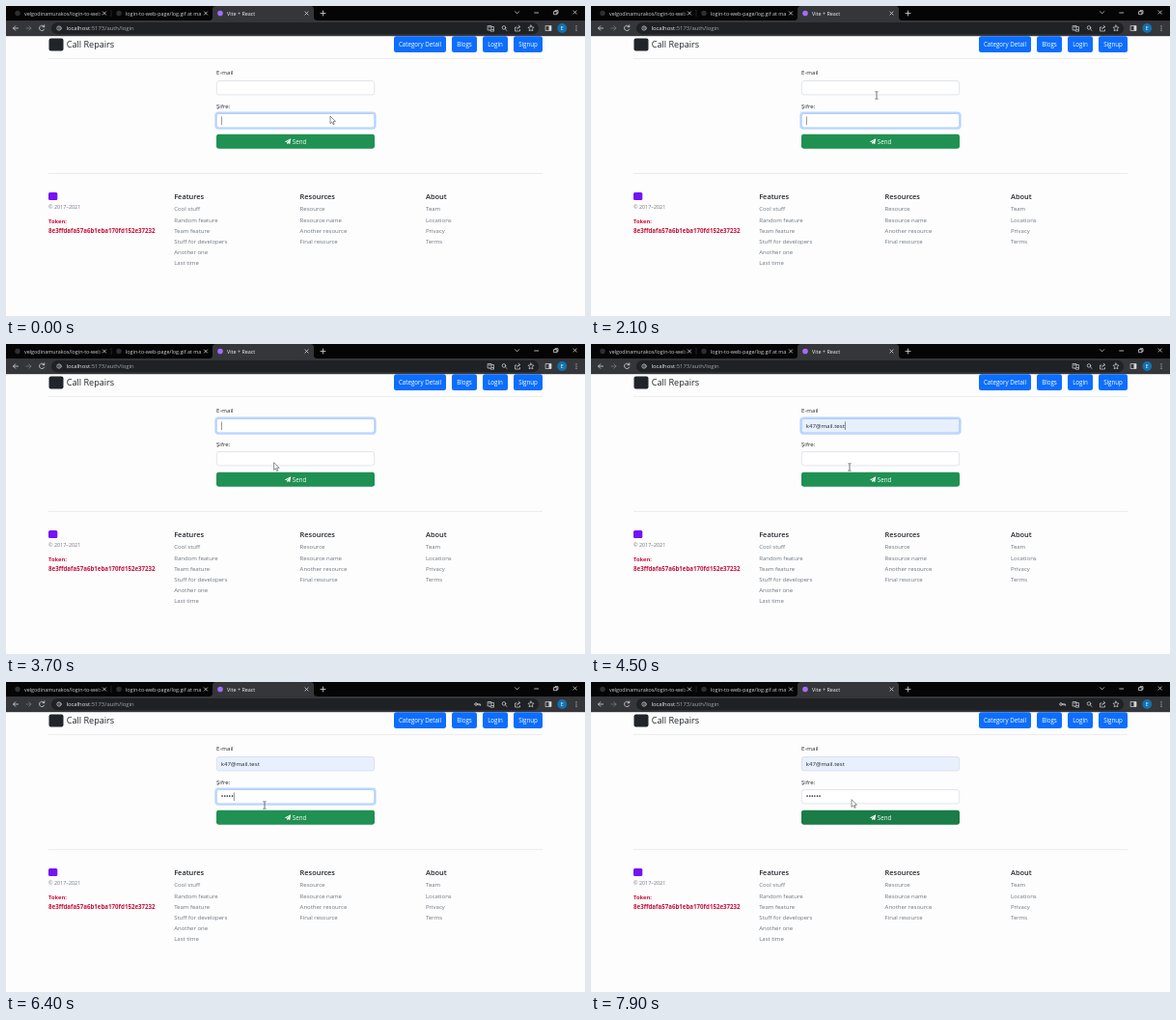
Write an HTML page that moves like this. It is 600 by 321 pixels and loops after 8 s.

```html
<!DOCTYPE html>
<html lang="en">
<head>
<meta charset="utf-8">
<title>Login form</title>
<style>
  html, body { margin: 0; width: 100%; height: 100%; overflow: hidden; background: #fdfdfe; }
  svg { display: block; width: 600px; height: 321px; }
  text { font: 6.1px "Open Sans", "Noto Sans", sans-serif; fill: #212529; white-space: pre; }
  .tab text { font-size: 5.4px; fill: #d0d3d7; }
  .tab .on { fill: #f1f3f4; }
  .line { fill: none; stroke: #d5d7da; stroke-width: .8; stroke-linecap: round; stroke-linejoin: round; }
  .brand { font-size: 9.1px; }
  .nav rect { fill: #0d6efd; }
  .nav text, .send text { fill: #fff; font-size: 6.2px; text-anchor: middle; }
  .rule { stroke: #e2e4e7; stroke-width: .7; }
  .head { font-size: 7.4px; font-weight: 600; }
  .link { font-size: 6px; fill: #6c757d; }
  .token { font-size: 6.17px; font-weight: 700; fill: #c9103a; }
  .ring { fill: none; stroke: #0d6efd; stroke-opacity: .28; stroke-width: 1.6; }
  .box { stroke-width: .6; }
  #caret { stroke: #222; stroke-width: .5; }
</style>
</head>
<body>
<svg viewBox="0 0 600 321">
  <defs>
    <linearGradient id="fade"><stop stop-color="#050505" stop-opacity="0"/><stop offset="1" stop-color="#050505"/></linearGradient>
    <path id="x" class="line" d="M-1.6-1.6 1.6 1.6M1.6-1.6-1.6 1.6"/>
  </defs>
  <rect width="600" height="321" fill="#fdfdfe"/>

  <!-- browser frame -->
  <rect width="600" height="16" fill="#050505"/>
  <rect y="15" width="600" height="16.2" fill="#35363a"/>
  <path d="M210.500 15q3.500 0 3.500-3.500V3.500q0-3.500 3.500-3.500h98q3.500 0 3.500 3.500v8q0 3.500 3.500 3.500z" fill="#35363a"/>
  <g class="tab">
    <circle cx="12" cy="7.500" r="2.700" fill="#2c3034"/>
    <text x="19" y="9.500">velgodinamurakos/login-to-web-</text>
    <rect x="93" y="2" width="10" height="11" fill="url(#fade)"/>
    <circle cx="117" cy="7.500" r="2.700" fill="#2c3034"/>
    <text x="124" y="9.500">login-to-web-page/log.gif at ma</text>
    <circle cx="222" cy="7.500" r="2.800" fill="#a66bff"/>
    <text class="on" x="229" y="9.500">Vite + React</text>
  </g>
  <path d="M109 4v7" stroke="#444" stroke-width=".5"/>
  <use href="#x" x="102" y="7.500"/><use href="#x" x="207" y="7.500"/><use href="#x" x="311.500" y="7.500"/>
  <use href="#x" x="589.700" y="6.500"/>
  <path class="line" d="M326 7.500h5M328.500 5v5M527.500 5.700l2.100 2.100 2.100-2.100M547.700 7h4M568 5.700h3v3H568zM569 5.700v-1h3v3h-1"/>
  <rect x="47" y="17" width="505" height="12.300" rx="6.150" fill="#202124"/>
  <path class="line" d="M12.500 23H7.500m2.300-2.300L7.500 23l2.300 2.300M39.600 21.500a2.700 2.700 0 1 0 .1 2.600M39.800 19.800v1.900h-1.900"/>
  <path class="line" style="stroke:#77797d" d="M21 23h5m-2.300-2.300L26 23l-2.300 2.300"/>
  <g class="line" style="stroke-width:.7">
    <circle cx="55" cy="23" r="2.200"/><path d="M55 22.800v1.200M55 21.800v.1"/>
    <path d="M499.500 20.500h3.500v4.500h-3.500zM503 21.500h2.500v4.700h-3.200l-.8-1.200M500.300 22h1.800M503.600 24.500h1.200"/>
    <circle cx="516" cy="22.400" r="1.800"/><path d="M517.400 23.800l1.700 1.700"/>
    <path d="M529 22h-1.500v4h5v-1.500M529.500 24q.3-2.500 3-2.500m-1.300-1.400 1.500 1.400-1.500 1.400"/>
    <path d="M544 20l.9 1.900 2.100.3-1.500 1.500.4 2.100-1.900-1-1.900 1 .4-2.100-1.500-1.500 2.100-.3z"/>
    <path d="M559.500 20.500h5.500v5h-5.500z"/>
  </g>
  <rect x="562.500" y="20.500" width="2.500" height="5" fill="#d5d7da"/>
  <circle cx="576.300" cy="23" r="4.900" fill="#1272b0"/>
  <text x="576.300" y="25" text-anchor="middle" style="font-size:5.400px;fill:#fff">E</text>
  <path class="line" style="stroke-width:1.200" d="M591 20.800v0M591 23v0M591 25.200v0"/>
  <g id="key" class="line"><circle cx="487" cy="23" r="1.300"/><path d="M488.300 23h3.300v1.300M490 23v1"/></g>
  <text x="62.500" y="25.200" style="font-size:5.900px;fill:#e8eaed">localhost<tspan fill="#a4a8ad">:5173/auth/login</tspan></text>

  <!-- page -->
  <rect x="44.500" y="33.500" width="15" height="13" rx="2" fill="#212529"/>
  <text class="brand" x="62.700" y="43.400">Call Repairs</text>
  <g class="nav" id="nav"></g>
  <path class="rule" d="M44 54.400H556M44 173.400H556"/>
  <text x="218" y="71">E-mail</text>
  <text x="218" y="105.600">Şifre:</text>
  <g id="mail" transform="translate(218 77.200)"></g>
  <g id="pass" transform="translate(218 111.200)"></g>
  <path id="caret" d="M0-4.300V4.300"/>
  <g class="send">
    <rect id="send" x="218" y="132.700" width="164" height="15" rx="2.400"/>
    <path fill="#fff" d="M295.200 137.300l-1 5.600-2.200-.9-1 1.200v-1.700l3-3.100-3.600 2.700-1.600-.7z"/>
    <text x="304" y="142.500">Send</text>
  </g>

  <rect x="44" y="193" width="9.300" height="8" rx="1.500" fill="#7413f3"/>
  <text class="link" x="44" y="209.900" style="font-size:5.400px">© 2017–2021</text>
  <text class="token" x="44" y="225.200" style="font-size:5.800px">Token:</text>
  <text class="token" x="44" y="235">8e3ffdafa57a6b1eba170fd152e37232</text>
  <g id="links"></g>

  <g id="pointer">
    <path id="arrow" d="M0 0V7.700L1.800 6.100 3 8.700 4.200 8.200 3.100 5.600H5.500Z" fill="#fff" stroke="#222" stroke-width=".5"/>
    <path id="beam" d="M-1.600-3.700H-.4L0-3.300.4-3.700H1.600M0-3.300V3.300M-1.600 3.700H-.4L0 3.300.4 3.700H1.600" fill="none" stroke="#222" stroke-width=".6"/>
    <path id="hand" d="M0 0q.9-.3 1 .8v2.500l2.500.6q1 .3.800 1.400l-.6 3H.2L-2 5.400q0-1 1.200-.5L-.8 5V.700Q-.8 0 0 0z" fill="#fff" stroke="#222" stroke-width=".5"/>
  </g>
</svg>
<script>
const $ = id => document.getElementById(id);
const LOOP = 8000;

const buttons = [['Category Detail', 402, 54], ['Blogs', 462, 26], ['Login', 494, 26], ['Signup', 526, 30]];
$('nav').innerHTML = buttons.map(([name, x, w]) =>
  `<rect x="${x}" y="31.2" width="${w}" height="16.8" rx="2.5"/><text x="${x + w / 2}" y="41.9">${name}</text>`).join('');

const columns = [
  ['Features', 'Cool stuff', 'Random feature', 'Team feature', 'Stuff for developers', 'Another one', 'Last time'],
  ['Resources', 'Resource', 'Resource name', 'Another resource', 'Final resource'],
  ['About', 'Team', 'Locations', 'Privacy', 'Terms']
];
$('links').innerHTML = columns.map(([head, ...items], c) => {
  const x = 174.2 + c * 130.4;
  return `<text class="head" x="${x}" y="199.7">${head}</text>` + items.map((item, i) =>
    `<text class="link" x="${x}" y="${212.4 + i * 11.13}">${item}</text>`).join('');
}).join('');

function makeInput(id) {
  const g = $(id);
  g.innerHTML = '<rect class="ring" x="-.8" y="-.8" width="165.6" height="16.6" rx="3"/>' +
    '<rect class="box" x=".3" y=".3" width="163.4" height="14.4" rx="2.4"/><text x="4.8" y="9.6"></text>';
  const [ring, box, text] = g.children;
  return { ring, box, text };
}
const mail = makeInput('mail'), pass = makeInput('pass');
pass.text.style.fontSize = '6.9px';

// time, x, y of the pointer
const path = [
  [0, 336, 114], [150, 330, 111], [600, 246.3, 81.8], [1000, 246.3, 81.8], [1700, 262, 84], [2100, 296, 92.5],
  [2300, 297, 87], [2800, 297, 87], [3200, 297.5, 93.5], [3400, 297.5, 93.5], [3800, 274, 128],
  [4200, 268, 127.5], [6800, 268, 127.5], [7100, 268, 139], [7600, 268, 139], [7900, 270, 121.7], [8000, 270, 121.7]
];
const keys = [5500, 5700, 5900, 6200, 6400, 6600];
const FILL = 4100, TO_MAIL = 2500, TO_PASS = 4900, BLUR = 7200;

const ramp = (t, from, ms = 150) => Math.min(1, Math.max(0, (t - from) / ms));
const ease = p => p * p * (3 - 2 * p);
const within = (t, a, b) => t >= a && t < b;
const show = (el, on) => el.style.display = on ? '' : 'none';
const mix = (a, b, p) => `rgb(${a.map((v, i) => Math.round(v + (b[i] - v) * p))})`;

function pointAt(t) {
  const i = path.findIndex(p => p[0] > t);
  const [a, ax, ay] = path[i - 1], [b, bx, by] = path[i];
  const p = ease((t - a) / (b - a));
  return [ax + (bx - ax) * p, ay + (by - ay) * p];
}

function paint(input, focus, fill) {
  input.ring.style.opacity = focus;
  input.box.style.stroke = mix([206, 212, 218], [134, 183, 254], focus);
  input.box.style.fill = fill;
}

function setText(el, value) {
  if (el.textContent !== value) el.textContent = value;
}

function draw(t) {
  const typed = keys.filter(k => t >= k).length;
  setText(mail.text, t >= FILL ? 'k47@mail.test' : '');
  setText(pass.text, '•'.repeat(typed));
  const onMail = ramp(t, TO_MAIL) - ramp(t, TO_PASS);
  const onPass = 1 - ramp(t, TO_MAIL) + ramp(t, TO_PASS) - ramp(t, BLUR);
  paint(mail, onMail, t >= FILL ? '#e8f0fe' : '#fff');
  paint(pass, onPass, '#fff');

  // the blink restarts on focus and on every input
  const start = Math.max(...[0, TO_MAIL, FILL, TO_PASS, ...keys].filter(k => t >= k));
  const inMail = within(t, TO_MAIL, TO_PASS);
  const field = inMail ? mail : pass;
  const caretX = 223 + field.text.getComputedTextLength() + .4;
  $('caret').setAttribute('transform', `translate(${caretX} ${inMail ? 84.7 : 118.7})`);
  show($('caret'), t < BLUR && (t - start) % 1000 < 500);

  show($('key'), t >= keys[0]);
  const hover = ramp(t, 6950) - ramp(t, 7920);
  $('send').style.fill = mix([31, 145, 82], [26, 124, 70], hover);

  const [x, y] = pointAt(t);
  $('pointer').setAttribute('transform', `translate(${x} ${y})`);
  const beam = within(t, 1200, 2900) || within(t, 4000, 6920);
  const hand = within(t, 6920, 7750);
  show($('beam'), beam);
  show($('hand'), hand);
  show($('arrow'), !beam && !hand);
}

const began = performance.now();
function tick() {
  draw((performance.now() - began) % LOOP);
  requestAnimationFrame(tick);
}
tick();
</script>
</body>
</html>
```
